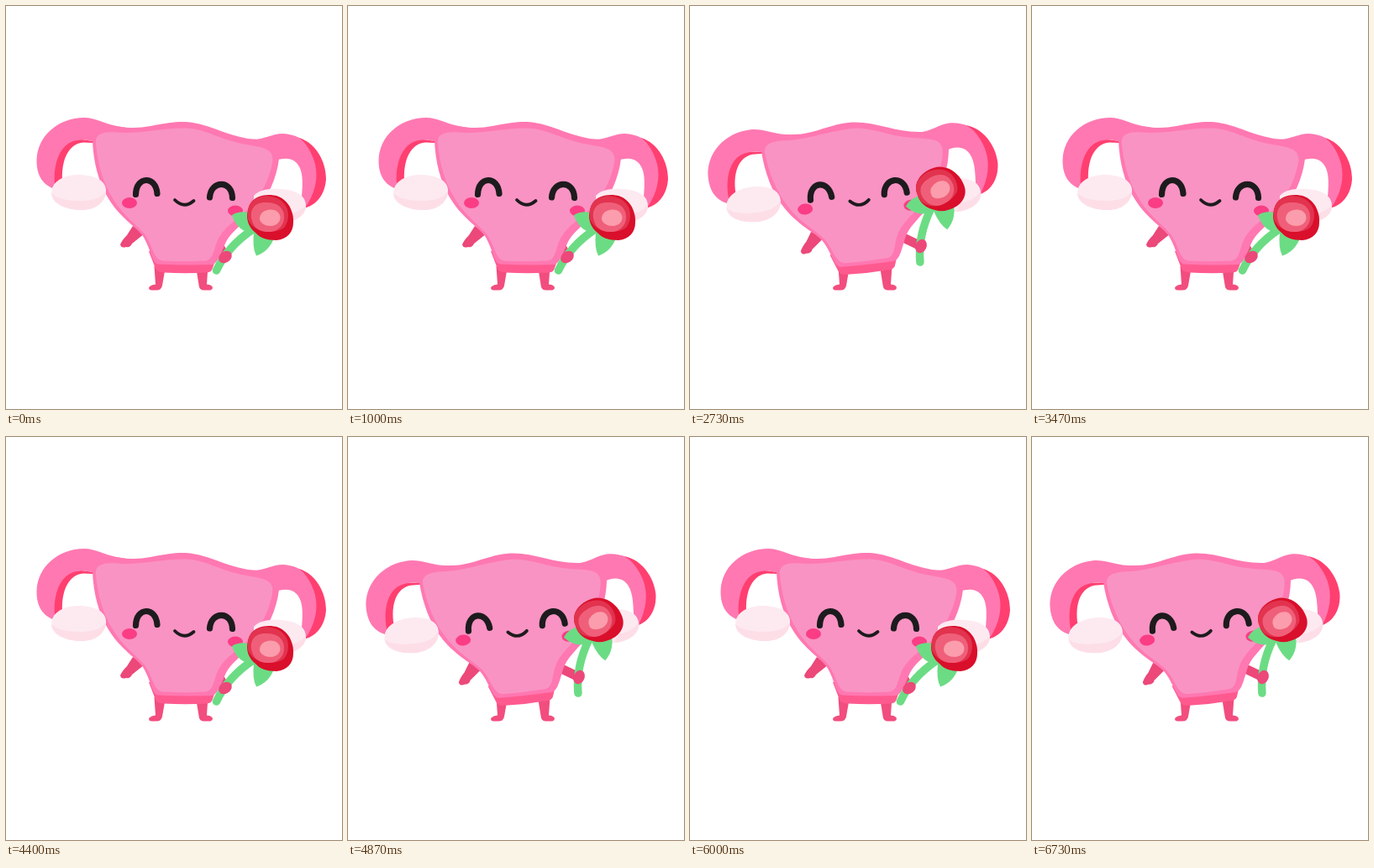
These frames come from a looping animation (400x480 px, 6990 ms). An HTML page:

```html
<!DOCTYPE html>
<html lang="en">
<head>
<meta charset="utf-8">
<title>Swaying character with a flower</title>
<style>
  html, body { margin: 0; width: 100%; height: 100%; overflow: hidden; background: #fff; }
  svg { display: block; width: 100vw; height: 100vh; }
  .line { fill: none; stroke-linecap: round; stroke-linejoin: round; }
</style>
</head>
<body>
<svg viewBox="0 0 400 480">
  <g id="legs" fill="#f24d7f">
    <path d="M176.500 310H190L186 333Q185 338.500 179 338.500H173Q169 338 170.500 334.500Q173 332 178 331.500Z"/>
    <path d="M226 310H240.500L239 331.500Q246 332 246 336Q245 339 240 338.500H235Q230 338 229.500 332Z"/>
  </g>

  <path id="arm" class="line" stroke="#ec487a" stroke-width="11"/>

  <g id="body">
    <path fill="#ec487a" d="M151 262L165 271L150 283Q148 288 143 287Q137 289 136 284Q138 279 144 273Z"/>

    <!-- left tube -->
    <path fill="#ff3f70" d="M54 214C54 182 62 158 90 159L104 161L104 163L92 162.500C75 164 66 182 67 207Z"/>
    <path fill="#ff78b1" d="M55 217C40 210 36.500 197 36.500 184C37 155 62 133 93 133C107 133 116 140 134 143.500L150 146L110 175L104 161.500C98 159.500 91 159 85 160C66 162 56 185 58 212Z"/>

    <!-- right tube -->
    <path fill="#ff78b1" d="M290 159C307 160 316 152 330 152C356 153 379 177 380 203C380 222 372 236 355 240L352 228C354 206 353 195 346 187C339 180 330 181 318 185Z"/>
    <path fill="#ff3f70" d="M349 157C368 163 381 184 381 206C380 222 372 236 356 240.500C368 223 372 205 368 188C364 174 358 164 349 157Z"/>

    <!-- trunk -->
    <path fill="#ff5a8f" d="M170 292L178 313Q180 317 188 317.500Q214 319 239 317.500Q245 317 246 312L253 292Z"/>
    <path fill="#ff78b1" d="M104 146L134 143.500C150 146 160 145 172 143C192 139 202 137.500 214 138C244 140 267 158 300 159L325 182C322 206 312 228 296 245C279 263 268 268 261 283C256 294 252 308 244 308Q214 309 181 307.500C173 306 173 290 163 274C156 264 136 252 123 231C110 211 104 185 103 161Z"/>
    <path fill="#f993c3" d="M107 164C105 151 119 149.500 132 150.500C155 153 179 146 213 145.500C239 146 253 160 292 166C308 169 320 171 317 187C313 208 304 226 287 243C274 255 262 262 254 275C247 287 248 303 237 303.500Q211 305 186 303.500C176 302 175 287 166 273C157 261 139 250 127 229C115 210 109 187 107 164Z"/>

    <!-- ovaries -->
    <path fill="#fdeaf1" d="M54 223C55 207 71 200.500 89 201C108 202 119 209 119 220C119 234 106 243 90 243C71 243 54 236 54 223Z"/>
    <path fill="#fddee7" d="M54 223C56 236 72 243 90 243C106 243 119 234 119 220C115 228 104 232 89 232C72 232 60 229 54 223Z"/>
    <path fill="#fdeaf1" d="M295 226C301 219 313 217 327 218C346 219 357 226 357 238C357 250 344 258 326 258C309 257 294 249 295 226Z"/>
    <path fill="#fddee7" d="M357 236C358 250 344 258 326 258L330 248C343 248 353 243 357 236Z"/>

    <!-- face -->
    <g fill="#fa3d85">
      <ellipse cx="147" cy="234.500" rx="9" ry="6.500"/>
      <ellipse cx="273" cy="244" rx="9" ry="6.500"/>
    </g>
    <g class="line" stroke="#1d1b1d">
      <path stroke-width="7.200" d="M154.500 224.500C155 202 178.500 202 180 223.500M242.500 228C244 207 269 207 269.500 228.500"/>
      <path stroke-width="3.800" d="M201 231Q212 242 223.500 232"/>
    </g>
  </g>

  <g id="flower">
    <path class="line" stroke="#6cdc84" stroke-width="9.500" d="M250.500 315Q264 286 294 266"/>
    <path fill="#6cdc84" d="M269 249Q282 241 299 250L320 274Q314 292 298 297.500Q293 288 295 270Q276 270 269 249Z"/>
    <path fill="#d90f2b" d="M299 228C308 223 325 224 331 231C338 236 343 248 342 258C342 269 335 278 322 279C310 279 302 276 297 270C289 264 285 253 288 244C289 236 293 231 299 228Z"/>
    <path fill="#e2334f" d="M288 254C286 240 291 231 301 228C315 223 331 230 335 242C337 250 336 258 331 264C320 272 296 272 288 254Z"/>
    <path fill="#f05f79" d="M293 256C289 243 296 234 308 234C322 233 331 240 331 250C332 262 322 270 311 269C302 269 295 264 293 256Z"/>
    <path fill="#fb9dac" d="M305 246C310 242 319 241 324 246C329 251 326 259 320 261C313 264 303 260 302 254Q302 249 305 246Z"/>
    <ellipse cx="261" cy="299" rx="8.500" ry="6.500" transform="rotate(-36 261 299)" fill="#ec487a"/>
  </g>
</svg>
<script>
  const LOOP = 6990, BEAT = 1000, SWITCH = 525;
  const [body, flower, arm] = ["body", "flower", "arm"].map(id => document.getElementById(id));

  const poses = {
    right: { lean: 0, swing: 0, shoulder: [251, 281], hand: [261, 299] },
    left: { lean: -6.5, swing: -30, shoulder: [250, 274], hand: [275, 286] }
  };
  const grip = poses.right.hand;

  function draw(time) {
    const beat = (time % LOOP) % BEAT;
    const pose = beat < SWITCH ? poses.right : poses.left;
    body.setAttribute("transform", `rotate(${pose.lean} 208 325)`);
    flower.setAttribute("transform",
      `translate(${pose.hand}) rotate(${pose.swing}) translate(${-grip[0]} ${-grip[1]})`);
    arm.setAttribute("d", `M${pose.shoulder}L${pose.hand}`);
  }

  const start = performance.now();
  function tick() {
    draw(performance.now() - start);
    requestAnimationFrame(tick);
  }
  tick();
</script>
</body>
</html>
```
